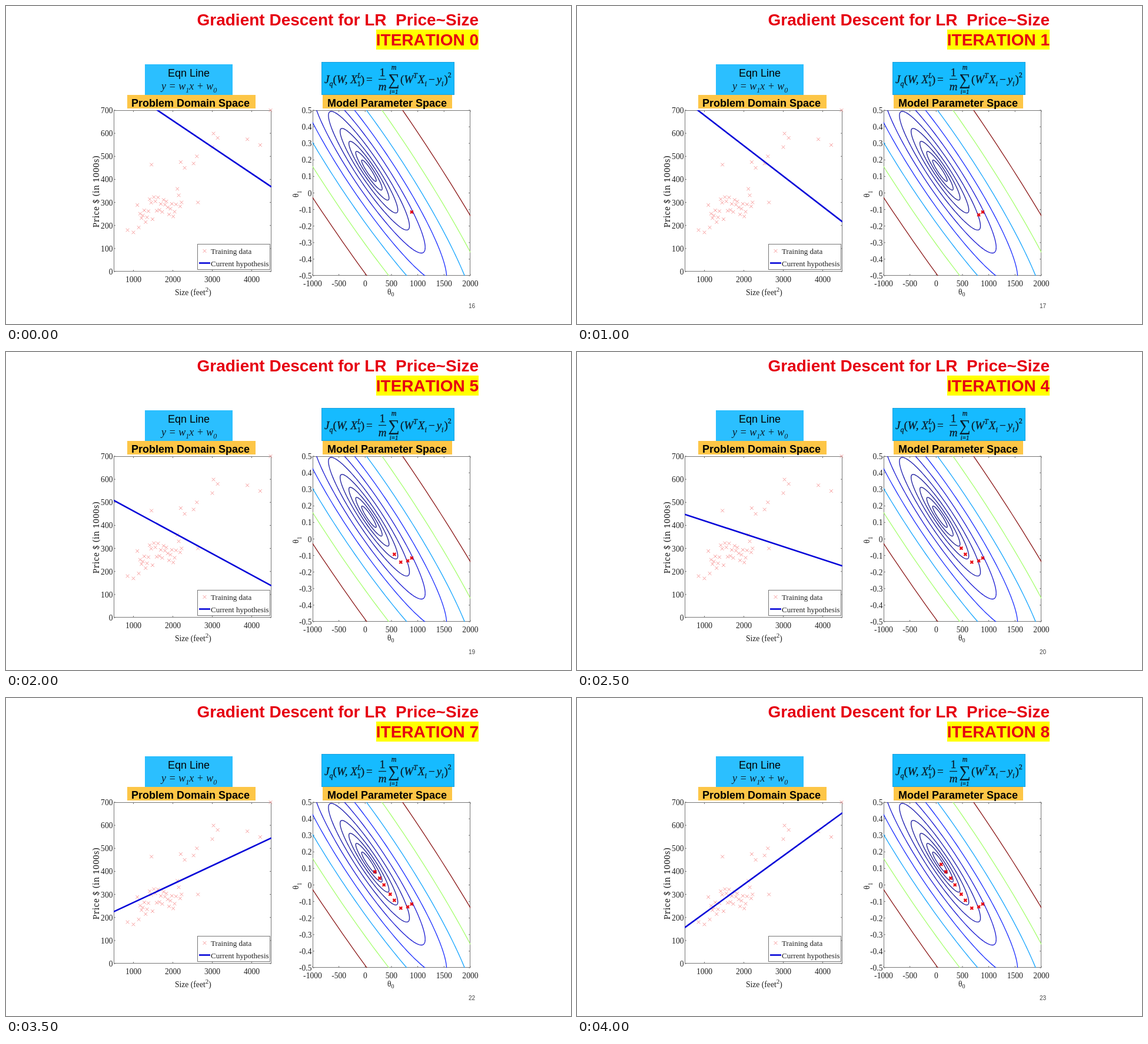
An HTML page for the animation above (5000 ms loop, 960 by 540 pixels).

```html
<!DOCTYPE html>
<html lang="en">
<head>
<meta charset="utf-8">
<title>Gradient descent</title>
<style>
  html, body { margin: 0; width: 100%; height: 100%; overflow: hidden; background: #fff; }
  svg { display: block; width: 960px; height: 540px; }
  text { white-space: pre; font-kerning: none; }
  .sans { font-family: "Liberation Sans", Arial, sans-serif; }
  .bold { font-weight: bold; }
  .serif { font: 13.6px "Liberation Serif", "Times New Roman", serif; fill: #222; }
  .legend { font-size: 13px; }
  .math { font: italic 19px "Liberation Serif", "Times New Roman", serif; fill: #0b1d2b; }
  #cost { stroke: #0b1d2b; stroke-width: .3; }
  .title { font-size: 28px; fill: #e60012; text-anchor: end; }
  .head { font-size: 18px; fill: #000; }
  .small { font-size: 12px; }
  .up { font-style: normal; }
  .mid { text-anchor: middle; }
  .end { text-anchor: end; }
  .frame, .tick { fill: none; stroke: #777; stroke-width: 1; }
  .contour { fill: none; stroke-width: 1.35; opacity: .88; }
  .datum { fill: none; stroke: #f79a9a; stroke-width: 1; }
  .step { fill: none; stroke: #e8000c; stroke-width: 2.2; }
  .fit { stroke: #0505d8; stroke-width: 2.6; }
</style>
</head>
<body>
<svg viewBox="0 0 960 540">
  <defs>
    <clipPath id="leftClip"><rect x="183" y="177" width="268" height="274"/></clipPath>
    <clipPath id="rightClip"><rect x="521" y="177" width="268" height="281"/></clipPath>
  </defs>
  <rect width="960" height="540" fill="#fff"/>

  <text class="sans bold title" x="803" y="33">Gradient Descent for LR  Price~Size</text>
  <rect x="629" y="40" width="174" height="34" fill="#ff0"/>
  <text class="sans bold title" id="iteration" x="803" y="67"></text>

  <rect x="236" y="99" width="149" height="52" fill="#2bbfff"/>
  <text class="sans head" x="275" y="120">Eqn Line</text>
  <text class="math" x="264" y="142" style="font-size:18px">y = w<tspan class="small" dy="5">1</tspan><tspan dy="-5">x + w</tspan><tspan class="small" dy="5">0</tspan></text>
  <rect x="206" y="151" width="218" height="23" fill="#fdc647"/>
  <text class="sans bold head" x="213" y="171">Problem Domain Space</text>

  <rect x="536.5" y="95.5" width="225" height="55" fill="#16bbff" stroke="#1c9fdc"/>
  <g id="cost">
    <text class="math" x="541" y="131">J<tspan class="small" dy="5">q</tspan><tspan class="up" dy="-5">(</tspan>W, X<tspan class="small" dy="-9">L</tspan><tspan class="small up" dx="-7" dy="14">1</tspan><tspan class="up" dy="-5">)<tspan dx="3">=</tspan></tspan></text>
    <text class="math up mid" x="639.5" y="119">1</text>
    <path d="M633 124.5h13" stroke-width="1.2"/>
    <text class="math mid" x="639.5" y="143">m</text>
    <text class="math mid small" x="659" y="108">m</text>
    <text class="math up mid" x="659" y="134" style="font-size:27px">∑</text>
    <text class="math mid" x="659" y="149" style="font-size:10px">i=1</text>
    <text class="math" x="670" y="131"><tspan class="up">(</tspan>W<tspan class="small" dy="-9">T</tspan><tspan dx="1" dy="9">X</tspan><tspan class="small" dy="5">i</tspan><tspan dx="2" dy="-5">−</tspan><tspan dx="2">y</tspan><tspan class="small" dy="5">i</tspan><tspan class="up" dx="1" dy="-5">)</tspan><tspan class="small up" dy="-10">2</tspan></text>
  </g>
  <rect x="538" y="151" width="220" height="23" fill="#fdc647"/>
  <text class="sans bold head" x="546" y="171">Model Parameter Space</text>

  <g id="axes"></g>
  <g clip-path="url(#rightClip)" id="contours"></g>
  <path class="step" id="steps"/>
  <path class="datum" id="data"/>
  <line class="fit" id="hypothesis" x1="183" x2="451" clip-path="url(#leftClip)"/>

  <rect class="frame" x="325.5" y="404.5" width="123" height="43" style="fill:#fff"/>
  <path class="datum" id="legendMark"/>
  <text class="serif legend" x="348" y="421">Training data</text>
  <path class="fit" d="M328 436.5h19"/>
  <text class="serif legend" x="348" y="442">Current hypothesis</text>

  <text class="serif" x="287" y="491">Size (feet<tspan dy="-6" font-size="11">2</tspan><tspan dy="6">)</tspan></text>
  <text class="mid" transform="translate(158 315) rotate(-90)" fill="#222"
    style="font:14px 'Noto Serif',serif;letter-spacing:.5px">Price $ (in 1000s)</text>
  <text class="serif" x="648" y="490">θ<tspan dy="3" font-size="10">0</tspan></text>
  <text class="serif" transform="translate(497 325) rotate(-90)">θ<tspan dy="5" font-size="10">1</tspan></text>
  <text class="sans" id="page" x="786" y="513" font-size="10" fill="#444"></text>
</svg>
<script>
const $ = id => document.getElementById(id);
const add = (parent, tag, attrs, content = '') => {
  const node = document.createElementNS('http://www.w3.org/2000/svg', tag);
  for (const key in attrs) node.setAttribute(key, attrs[key]);
  node.textContent = content;
  parent.append(node);
};
const range = (n, f) => Array.from({ length: n }, (_, i) => f(i));
const clamp = (v, low, high) => Math.max(low, Math.min(high, v));
const label = (x, y, content, cls) => add($('axes'), 'text', { x, y, class: 'serif ' + cls }, content);
const cross = (x, y, r) => `M${x - r} ${y - r}l${2 * r} ${2 * r}m0 ${-2 * r}l${-2 * r} ${2 * r}`;

// Plot coordinates
const sizeX = size => 183 + (size - 500) * 0.067;
const priceY = price => 451 - price * 0.3914;
const theta0X = t => 610.3 + t * 0.08933;
const theta1Y = t => 317.5 - t * 281;

function drawAxes(x, y, w, h, xs, ys) {
  add($('axes'), 'rect', { class: 'frame', x: x + .5, y: y + .5, width: w - 1, height: h - 1 });
  let ticks = '';
  for (const [px, name] of xs) {
    ticks += `M${px} ${y + h}v-3M${px} ${y}v3`;
    label(px, y + h + 17.5, name, 'mid');
  }
  for (const [py, name] of ys) {
    ticks += `M${x} ${py}h3M${x + w} ${py}h-3`;
    label(x - 1.5, py + 5, name, 'end');
  }
  add($('axes'), 'path', { class: 'tick', d: ticks });
}
drawAxes(183, 177, 268, 274,
  range(4, i => [sizeX(1000 * (i + 1)), 1000 * (i + 1)]),
  range(8, i => [priceY(100 * i), 100 * i]));
drawAxes(521, 177, 268, 281,
  range(7, i => [theta0X(500 * i - 1000), 500 * i - 1000]),
  range(11, i => [theta1Y((i - 5) / 10), (i - 5) / 10]));

// Training data: a noisy rising cluster plus the houses that stand apart from it
const noise = i => {
  const v = Math.sin(i * 12.9898) * 43758.5453;
  return v - Math.floor(v) - 0.5;
};
const cluster = range(33, i => {
  const size = 1100 + 35 * i;
  return [size, 172 + 0.062 * size + 115 * noise(i + 1)];
});
const apart = [[852, 180], [1000, 170], [1458, 464], [2200, 475], [2300, 450], [2526, 469], [2609, 500],
  [2637, 300], [3000, 540], [3031, 599], [3137, 580], [3890, 574], [4215, 549], [4478, 700]];
$('data').setAttribute('d',
  [...cluster, ...apart].map(([size, price]) => cross(sizeX(size), priceY(price), 2.8)).join(''));
$('legendMark').setAttribute('d', cross(337.5, 416, 2.8));

// Elliptical level sets of the squared error, on log-spaced levels
const level = k => 3333 * 1.8815 ** k;
const jet = t => 'rgb(' + [3, 2, 1].map(c =>
  Math.round(255 * clamp(1.5 - Math.abs(4 * t - c), 0, 1))) + ')';
for (let k = 0; k < 10; k++) {
  const h = Math.sqrt((level(k) - 2043) / 3.914);
  const points = range(241, i => {
    const a = i * Math.PI / 120;
    return [616.7 + 0.683 * h * Math.cos(a), 279.7 + h * Math.cos(a - 0.3744)].map(v => v.toFixed(2));
  });
  const t = (level(k) - level(0)) / (level(9) - level(0));
  add($('contours'), 'polyline', { class: 'contour', points: points.join(' '), stroke: jet(t) });
}

// Descent path as [theta0, theta1]; each step also defines the fitted line
const descent = [[885, -.115], [810, -.132], [677, -.14], [555, -.0926], [476, -.056],
  [357, .0006], [275, .041], [185, .08], [94, .1245]];
const iterations = [0, 1, 2, 5, 4, 6, 7, 8];

let shown = -1;
function draw(now) {
  const slide = clamp(Math.floor(now % 5000 / 500) - 1, 0, 7);
  if (slide !== shown) {
    shown = slide;
    const last = slide < 6 ? slide : slide + 1;
    const [theta0, theta1] = descent[last];
    $('iteration').textContent = 'ITERATION ' + iterations[slide];
    $('page').textContent = 16 + slide;
    $('hypothesis').setAttribute('y1', priceY(theta0 + theta1 * 500));
    $('hypothesis').setAttribute('y2', priceY(theta0 + theta1 * 4500));
    $('steps').setAttribute('d', descent.slice(0, last + 1)
      .map(([t0, t1]) => cross(theta0X(t0), theta1Y(t1), 2.4)).join(''));
  }
  requestAnimationFrame(draw);
}
draw(performance.now());
</script>
</body>
</html>
```
